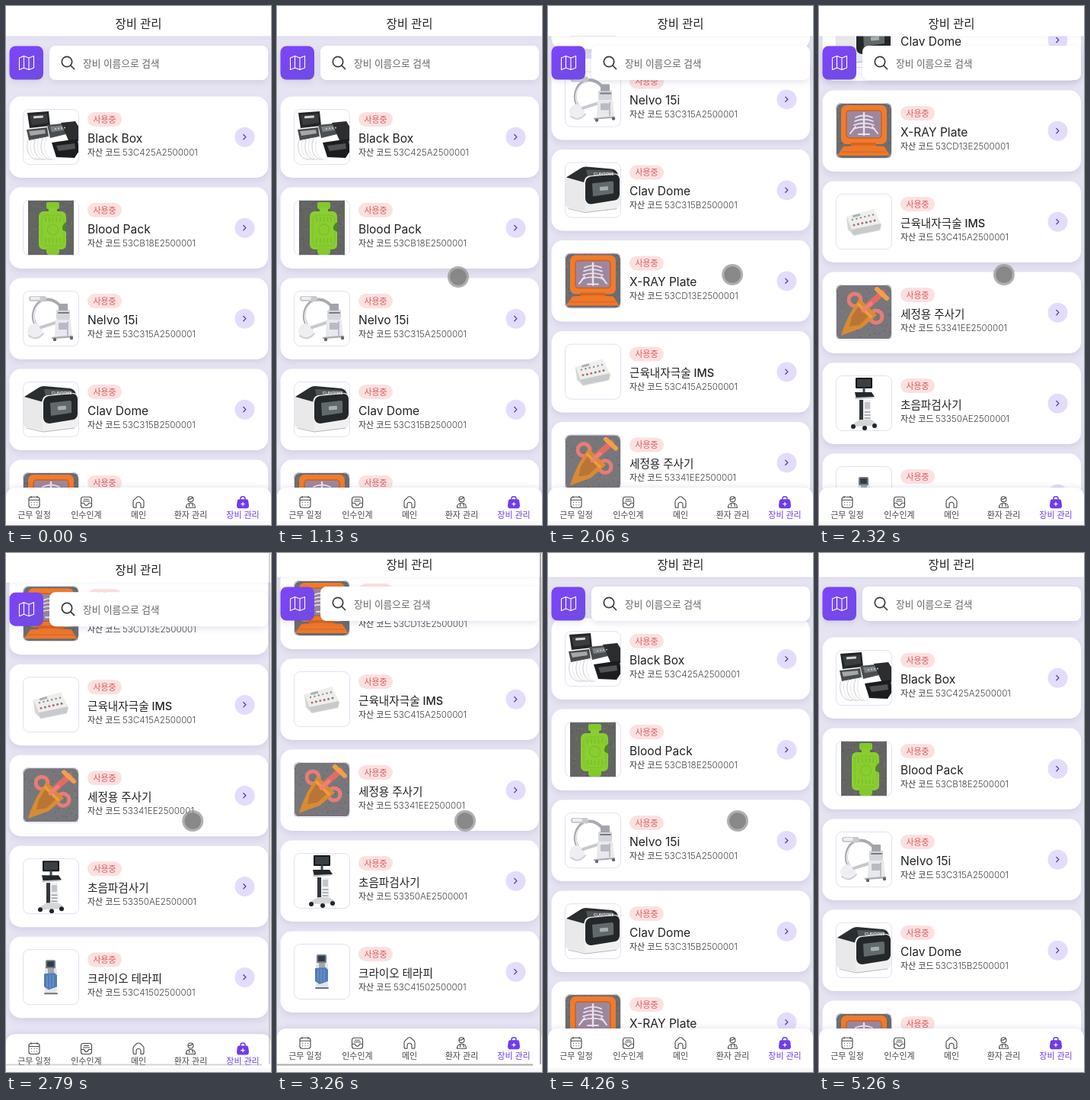
An HTML page for the animation above (5520 ms loop, 348 px wide and 680 px high).

```html
<!DOCTYPE html>
<html lang="ko">
<head>
<meta charset="utf-8">
<title>장비 관리</title>
<style>
  html, body { margin: 0; width: 100%; height: 100%; overflow: hidden; background: #e6e4f2; }
  svg { display: block; font-family: Inter, 'Noto Sans CJK KR', sans-serif; }
  .card { fill: #fff; filter: drop-shadow(0 4px 4px rgba(70, 55, 130, .11)); }
  .float { filter: drop-shadow(0 3px 4px rgba(70, 55, 130, .13)); }
  .top { filter: drop-shadow(0 1px 2px rgba(70, 55, 130, .07)); }
  .head { font-size: 15.5px; font-weight: 500; fill: #222; text-anchor: middle; }
  .hint { font-size: 12.7px; font-weight: 300; fill: #666; }
  .name { font-size: 15.6px; font-weight: 430; fill: #222; }
  .name.ko { font-size: 14.6px; font-weight: 500; }
  .label { font-size: 11px; fill: #333; }
  .code { font-size: 11.7px; font-weight: 300; fill: #444; }
  .badge { font-size: 10.9px; font-weight: 500; fill: #dc5a5c; text-anchor: middle; }
  .tab { font-size: 11px; text-anchor: middle; }
  .line { fill: none; stroke-linecap: round; stroke-linejoin: round; }
</style>
</head>
<body>
<svg id="stage" width="348" height="680" viewBox="0 0 348 680"></svg>
<script>
const LOOP = 5520, FRAMES = 83;

const rect = (x, y, w, h, fill, r = 0, extra = '') =>
  `<rect x="${x}" y="${y}" width="${w}" height="${h}" rx="${r}" fill="${fill}" ${extra}/>`;
const disc = (x, y, r, fill, extra = '') => `<circle cx="${x}" cy="${y}" r="${r}" fill="${fill}" ${extra}/>`;
const shape = (d, fill) => `<path d="${d}" fill="${fill}"/>`;
const line = (d, color, width = 1) => `<path class="line" d="${d}" stroke="${color}" stroke-width="${width}"/>`;
const text = (x, y, cls, str, extra = '') => `<text x="${x}" y="${y}" class="${cls}" ${extra}>${str}</text>`;
const repeat = (n, fn) => Array.from({ length: n }, (_, i) => fn(i)).join('');

// Stone-like backdrop with seeded specks
function gravel(x, w, h, base, seed) {
  const next = () => (seed = (seed * 16807) % 2147483647) / 2147483647;
  return rect(x, 0, w, h, base) + repeat(130, () => {
    const tone = next() < .5 ? '#454747' : '#8c8d89';
    return rect((x + next() * (w - 2)).toFixed(1), (next() * (h - 2)).toFixed(1), 1.5, 1.3, tone, 0, 'opacity=".45"');
  });
}

const art = {
  cases: () =>
    shape('M6 5 L34 3 36 22 9 25Z', '#232527') + shape('M9 8 L32 6 33 18 12 21Z', '#3a3d3f') +
    rect(14, 9, 13, 3, '#d4d4d4', 1, 'transform="rotate(-4 20 11)"') +
    shape('M5 27 L32 24 34 36 8 41Z', '#4a4d4f') + shape('M8 29 L29 27 30 32 10 35Z', '#a5a7a8') +
    shape('M32 21 L62 18 65 31 36 38Z', '#4c4f51') + shape('M36 23 L57 21 59 27 38 30Z', '#808385') +
    shape('M50 18 L69 16 74 24 73 42 60 41Z', '#2b2d2f') +
    shape('M38 44 L72 39 74 55 68 64 44 63Z', '#1b1d1f') + shape('M44 48 L68 45 69 52 47 55Z', '#515456') +
    repeat(6, i => line(`M${7 + i * 5} ${41 - i} C${3 + i * 4} 52 ${8 + i * 5} 68 ${22 + i * 4} 66`, i % 2 ? '#e3e3e6' : '#c5c6ca', .9)) +
    repeat(4, i => disc(43 + i * 4, 26 - i * .5, .9, '#d7d7d7')),
  bottle: () => gravel(7, 60, 74, '#636563', 41) +
    rect(31, 3, 17, 9, '#83c829', 2) + shape('M34 10 H45 V15 H51 Q57 16 57 22 V58 Q57 64 51 65 H27 Q21 64 21 58 V22 Q21 16 27 15 H34Z', '#8acd30') +
    rect(31, 62, 17, 10, '#84c82c', 4) +
    rect(25, 20, 29, 40, 'none', 6, 'stroke="#7cc02b"') +
    disc(39.5, 39, 7, 'none', 'stroke="#7abd2a" stroke-width="1.2"') +
    repeat(5, i => line(`M${30 + i * 4.8} 23v5M${30 + i * 4.8} 51v5`, '#7abd2a', 1.5)) +
    shape('M57 29 Q51 33 52 39 L57 42Z', '#55812c'),
  arm: () =>
    line('M18 46 C10 36 14 18 26 13 S49 16 55 30', '#a9abb1', 4) +
    line('M17 44 C12 34 15 20 27 14', '#f1f1f4', 1.6) +
    rect(8, 7, 23, 7, '#c9cad0', 3) + rect(10, 8, 13, 4, '#eeeef1', 2) +
    disc(16, 53, 10, '#eeeef3') + line('M8 59 Q18 67 27 56', '#cfd0d8', 2) +
    line('M24 48 L46 41', '#c6c8cf', 4) + rect(44, 25, 18, 13, '#d5d6dc', 2) +
    rect(47, 17, 12, 9, '#a2a4aa', 1) + line('M47 29 H60', '#777b83', 2) +
    shape('M43 38 H63 L65 60 H42Z', '#e9e9ed') + rect(47, 42, 11, 9, '#b9bbc3', 1) + line('M59 41V58', '#aaadb4', 1.5) +
    line('M39 62 L65 60', '#aeb0b7', 2.4) + disc(42, 64, 2.2, '#63666c') + disc(64, 62, 2.2, '#63666c'),
  cleaner: () =>
    shape('M1 22 Q2 18 6 18 L28 23 27 65 5 60 Q1 59 1 55Z', '#e9e9ea') +
    shape('M2 20 L21 8 Q24 6 28 6 L62 9 Q68 10 70 16 L72 24 27 27Z', '#2b2e30') +
    shape('M28 10 L62 11 66 16 30 19Z', '#505557') +
    shape('M25 27 Q26 19 32 18 L66 15 Q72 15 73 22 V54 Q73 60 67 61 L27 66Z', '#f0f0f0') +
    shape('M27 27 Q28 20 34 19 L65 16 Q71 16 72 22 V43 Q71 49 66 50 L35 55 Q28 55 27 48Z', '#25282a') +
    shape('M36 28 L62 25 Q64 25 64 28 V41 L37 45Z', '#62696a') +
    rect(46, 32, 11, 5, '#a5b0ad', 1, 'transform="rotate(-5 52 35)"') +
    text(38, 17, '', 'CLAVDOME', 'font-size="4.6" font-weight="700" fill="#eee"') +
    line('M5 61 L27 66 68 61', '#b7b7b8'),
  plate: () => gravel(0, 73, 72, '#6d6c6e', 97) +
    rect(7, 3, 60, 51, '#f07b2c', 7) + rect(14, 10, 46, 36, '#9d879f', 4, 'stroke="#cb611f" stroke-width="1.5"') +
    rect(20, 52, 33, 7, '#d8651f') + shape('M10 57 Q37 54 64 57 L71 69 H2Z', '#ee772a') + line('M7 64 H66', '#d46620') +
    line('M37 13V42', '#e9e3e9', 2.4) +
    repeat(4, i => line(`M${26 - i} ${19 + i * 5} Q37 ${14 + i * 5} ${48 + i} ${19 + i * 5}`, '#e9e3e9', 1.8)) +
    line('M19 40 L26 31M55 40 L48 31M30 41 H44', '#e9e3e9', 2),
  stimulator: () =>
    shape('M14 31 L50 21 60 41 58 48 24 55 16 47Z', '#d5d6d6') + shape('M14 30 L50 20 59 39 21 47Z', '#eeeeec') +
    shape('M21 47 L59 39 58 47 23 54Z', '#c9cacb') +
    repeat(6, i => disc(22 + i * 5.4, 34 - i * 1.3, 1.2, '#8d8f92') + disc(24 + i * 5.4, 41 - i * 1.2, 1.5, i % 2 ? '#7b7e82' : '#c66a61')) +
    rect(22, 27, 10, 3, '#a8b2b5', 0, 'transform="rotate(-15 27 28)"'),
  syringe: () => gravel(0, 73, 71, '#77777b', 271) +
    disc(25, 20, 8, 'none', 'stroke="#e87d74" stroke-width="5"') + disc(53, 42, 8, 'none', 'stroke="#e87d74" stroke-width="5"') +
    line('M43 27 L61 11', '#e36b62', 8) + line('M54 6 L67 18', '#f0a04a', 6) +
    shape('M31 18 L54 40 34 57 17 63 7 67 10 57 18 39Z', '#d98a35') + shape('M32 25 L46 39 31 53 18 55 21 42Z', '#b97535') +
    line('M30 26 L46 42', '#ef9a42', 4) + line('M36 34 L46 25', '#ed8178', 5),
  scanner: () =>
    rect(26, 3, 22, 14, '#17191c', 1) + rect(28, 5, 18, 10, '#3a3f44') + line('M37 17V23', '#45494d', 3) +
    shape('M25 22 H47 L51 28 27 31Z', '#25282b') + line('M26 30 L48 29', '#c7c9cc', 2) +
    shape('M32 32 H46 L47 60 H30Z', '#f0f0f2') + rect(31, 32, 5, 28, '#33373b') + rect(38, 35, 7, 9, '#c2c5ca') +
    repeat(3, i => line(`M38 ${48 + i * 4}h7`, '#70757b')) + shape('M23 63 L32 58 46 58 53 62 51 66 25 67Z', '#d5d6d9') +
    disc(23, 67, 3, '#222629') + disc(38, 69, 3, '#222629') + disc(51, 66, 3, '#222629'),
  cooler: () =>
    rect(30, 14, 13, 12, '#747b83', 2) + rect(32, 16, 9, 7, '#313b48') + rect(29, 25, 16, 33, '#e3e5e8', 2) +
    rect(33, 25, 8, 7, '#a3a7ad') + shape('M28 32 L42 31 45 34 45 49 34 53 28 49Z', '#527db8') +
    line('M32 35V49M36 34V50M40 34V49', '#7ba0d1', 1) + line('M29 58H45', '#6e737b', 2)
};

const items = [
  ['Black Box', '53C425A2500001', 'cases'],
  ['Blood Pack', '53CB18E2500001', 'bottle'],
  ['Nelvo 15i', '53C315A2500001', 'arm'],
  ['Clav Dome', '53C315B2500001', 'cleaner'],
  ['X-RAY Plate', '53CD13E2500001', 'plate'],
  ['근육내자극술 IMS', '53C415A2500001', 'stimulator'],
  ['세정용 주사기', '53341EE2500001', 'syringe'],
  ['초음파검사기', '53350AE2500001', 'scanner'],
  ['크라이오 테라피', '53C41502500001', 'cooler']
];

const card = ([name, code, pic], i) => `<g transform="translate(0 ${118.5 + i * 119})">
  <rect class="card" x="4.5" width="339.5" height="106.5" rx="15"/>
  <g transform="translate(22 16.5)"><g clip-path="url(#thumb)">${art[pic]()}</g>
    ${rect(.5, .5, 73, 72, 'none', 8, 'stroke="#e4e0f4"')}</g>
  ${rect(107, 20.5, 45, 19, '#fde0e0', 9.5)}${text(129.5, 34.2, 'badge', '사용중')}
  ${text(107, 60, /[가-힣]/.test(name) ? 'name ko' : 'name', name)}
  ${text(107, 77.3, 'label', '자산 코드')}${text(153, 77.3, 'code', code)}
  ${disc(313.5, 53.3, 13, '#e4dcfd')}${line('M311.8 50 l3.1 3.1 -3.1 3.1', '#5a3fa8', 1.3)}
</g>`;

const tabs = [
  ['근무 일정', 'M-7 -4 q0 -3 3 -3 h8 q3 0 3 3 v8 q0 3 -3 3 h-8 q-3 0 -3 -3zM-7 -3H7M-4 -8v2M4 -8v2M-3.5 0h.2M0 0h.2M3.5 0h.2M-3.5 3.5h.2M0 3.5h.2M3.5 3.5h.2'],
  ['인수인계', 'M-7 -4 q0 -3 3 -3 h8 q3 0 3 3 v8 q0 3 -3 3 h-8 q-3 0 -3 -3zM-7 1 h4 q1 3 3 3 t3 -3 h4M-3 -4h6M-4 -1.5h8'],
  ['메인', 'M-7 5 V-1 Q-7 -3 -5 -4 L-2 -7 Q0 -8 2 -7 L5 -4 Q7 -3 7 -1 V5 Q7 7 5 7 H3 V3 Q3 0 0 0 T-3 3 V7 H-5 Q-7 7 -7 5z'],
  ['환자 관리', 'M-3.5 -4 a3.5 3.5 0 1 0 7 0 a3.5 3.5 0 1 0 -7 0M-3 -4 Q1 -4 2 -6M-6 7 Q-6 1 0 1 T6 7zM-2 2 V5M2 2 L3 5'],
  ['장비 관리']
];

const tab = ([name, icon], i) => {
  const color = icon ? '#484848' : '#6f3ce8';
  const glyph = icon ? line(icon, color, 1.1)
    : line('M-3 -3 V-5 Q-3 -7.5 0 -7.5 T3 -5 V-3', color, 1.5) + shape('M-5 -4 H5 Q7 -4 7.3 -1 L8 4 Q8 8 5 8 H-5 Q-8 8 -8 4 L-7.3 -1 Q-7 -4 -5 -4Z', color) +
      line('M0 0 V4.4M-2.2 2.2 H2.2', '#fff', 1.2);
  const x = 37 + i * 68.5;
  return `<g transform="translate(${x} 650.3)">${glyph}</g>` +
    text(x, 670.8, 'tab', name, `fill="${color}" font-weight="${icon ? 400 : 500}"`);
};

const stage = document.getElementById('stage');
stage.innerHTML = `
<defs>
  <clipPath id="thumb"><rect width="74" height="73" rx="8"/></clipPath>
  <linearGradient id="violet" x2="1" y2="1"><stop stop-color="#7f43fa"/><stop offset="1" stop-color="#6f4ce0"/></linearGradient>
</defs>
${rect(0, 0, 348, 680, '#e6e4f2')}
<g id="page">
  <g id="list">${items.map(card).join('')}</g>
  <g class="float">${rect(4.5, 52.5, 44.5, 44, 'url(#violet)', 8)}</g>
  ${line('M17.5 68 L23.5 65.5 30 68 36.5 65.5 V81 L30 83.5 23.5 81 17.5 83.5ZM23.5 65.5V81M30 68V83.5', '#fff', 1.1)}
  <g class="float">${rect(57, 52, 287, 45, '#fff', 8)}</g>
  ${disc(80, 73, 6.7, 'none', 'stroke="#3a3a3a" stroke-width="1.7"')}${line('M85 78 L89.5 82.5', '#3a3a3a', 1.7)}
  ${text(101, 79.8, 'hint', '장비 이름으로 검색')}
  <g class="top">${rect(0, -10, 348, 49.5, '#fff')}</g>
  ${text(174, 28.8, 'head', '장비 관리')}
  <g style="filter:drop-shadow(0 -2px 3px rgba(70,55,130,.1))">${rect(0, 631, 348, 70, '#fff', 12)}</g>
  ${tabs.map(tab).join('')}
</g>
${rect(0, 675, 348, 5, '#f8f8f8')}
<g id="bars" opacity="0">${rect(345, 0, 2, 670, '#aaa')}${rect(0, 669.5, 336, 2, '#aaa')}</g>
<g id="dot">${disc(0, 0, 14, '#929292', 'opacity=".72"')}${disc(0, 0, 10.8, '#808080', 'opacity=".8"')}</g>`;

const [page, list, bars, dot] = ['page', 'list', 'bars', 'dot'].map(id => document.getElementById(id));

// Steps: [begin, end, distance, lag]
const scrolls = [[19, 28, 247, 1.345], [29, 38, 320, 1], [49, 57, -471, 1], [60, 66, -96, 1]];
// Steps: [step, x, y]
const path = [[11, 333, 647], [13, 286, 490], [15, 228, 344], [17, 238, 355], [19, 240, 352], [25, 241, 352],
  [35, 243, 352], [39, 244.5, 351], [49, 247, 351], [58, 248.5, 350], [64, 249, 351], [69, 249, 352],
  [73, 278, 440], [77, 336, 650], [78, 350, 682]];

const part = (n, a, b) => Math.min(1, Math.max(0, (n - a) / (b - a)));
const smooth = u => u * u * (3 - 2 * u);

function pointAt(n) {
  const i = Math.max(1, path.findIndex(p => p[0] >= n));
  const [a, b] = [path[i - 1], path[i]], u = part(n, a[0], b[0]);
  return [a[1] + (b[1] - a[1]) * u, a[2] + (b[2] - a[2]) * u];
}

function draw(ms) {
  const n = Math.floor((ms % LOOP + 8) * FRAMES / LOOP);
  const y = scrolls.reduce((sum, [a, b, d, lag]) => sum + d * smooth(part(n, a, b) ** lag), 0);
  list.setAttribute('transform', `translate(0 ${-y.toFixed(1)})`);
  page.setAttribute('transform', `translate(0 ${n < FRAMES ? -8 * smooth(part(n, 41, 46)) : 0})`);
  bars.setAttribute('opacity', part(n, 41, 43) * (1 - part(n, 49, 53)));
  const shown = n >= path[0][0] && n <= path[path.length - 1][0];
  dot.setAttribute('visibility', shown ? 'visible' : 'hidden');
  if (shown) dot.setAttribute('transform', `translate(${pointAt(n)})`);
}

const start = performance.now();
function tick() {
  draw(performance.now() - start);
  requestAnimationFrame(tick);
}
tick();
</script>
</body>
</html>
```
